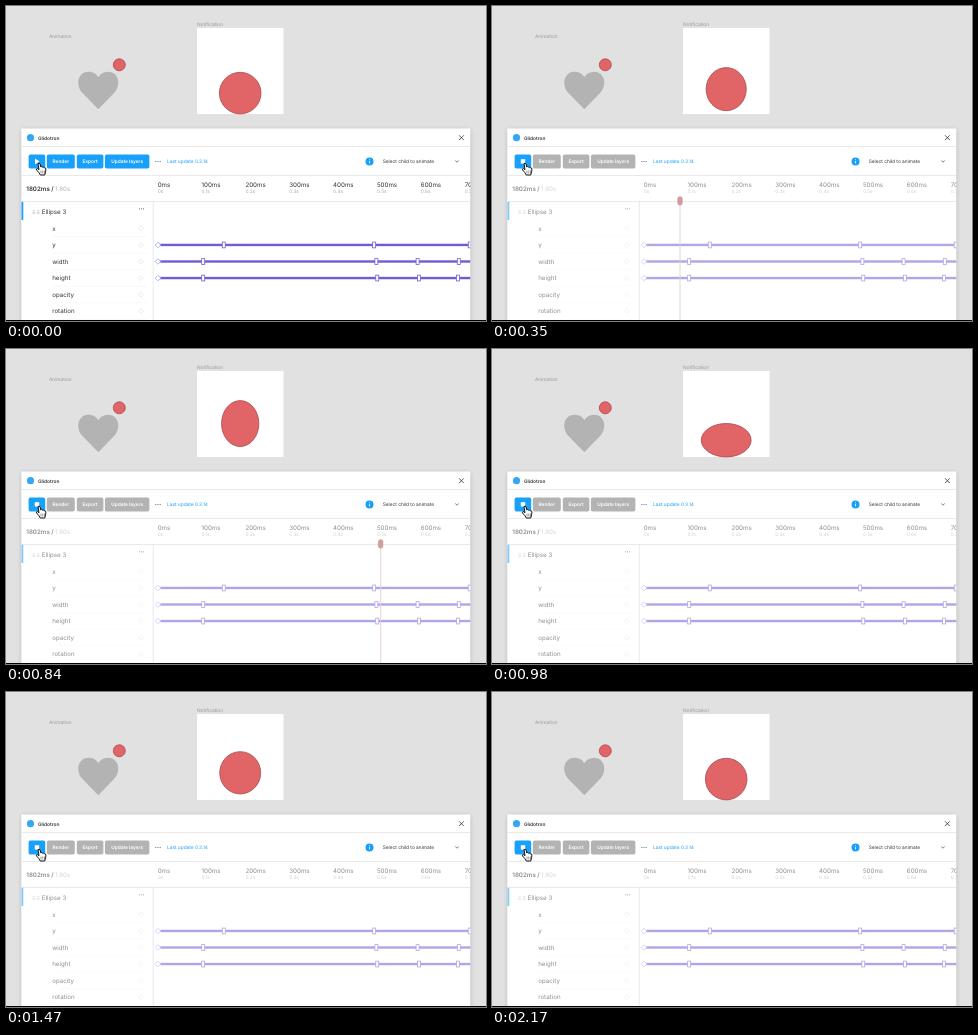
Animation of 480x315 px, one loop 2.24 s. Source, as an HTML page:

```html
<!DOCTYPE html>
<html lang="en">
<head>
<meta charset="utf-8">
<title>Bouncing notification</title>
<style>
  html, body { margin: 0; width: 100%; height: 100%; overflow: hidden; background: #e1e1e1; }
  svg { display: block; width: 480px; height: 315px; font-family: Inter, "Liberation Sans", sans-serif; text-rendering: geometricPrecision; }
  .s { font-size: 4.8px; }
  .m { font-size: 6.2px; }
  .b { font-weight: 600; }
</style>
</head>
<body>
<svg viewBox="0 0 480 315">
  <defs>
    <clipPath id="panelClip"><rect x="15.300" y="122.600" width="449" height="193"/></clipPath>
    <filter id="soft" x="-10%" y="-10%" width="120%" height="120%"><feGaussianBlur stdDeviation="2.5"/></filter>
  </defs>
  <rect width="480" height="315" fill="#e1e1e1"/>

  <g class="s" fill="#999">
    <text x="43" y="32">Animation</text>
    <text x="191" y="20">Notification</text>
  </g>
  <path fill="#b3b3b3" d="M92.300 103.300L76 86.500C69 78.500 72.300 65.800 82.500 65.800C87 65.800 90.500 68 92.300 71.200C94.200 68 97.500 65.800 102 65.800C112.300 65.800 115.700 78.500 108.500 86.500Z"/>
  <g fill="#e16467" stroke="#a9494d" stroke-width=".8">
    <circle cx="113.300" cy="58.800" r="6"/>
    <rect x="191" y="22" width="86.500" height="86" fill="#fff" stroke="none"/>
    <ellipse id="ball" cx="234.200"/>
  </g>

  <rect x="16" y="124" width="448" height="200" fill="#000" opacity=".2" filter="url(#soft)"/>
  <g clip-path="url(#panelClip)">
    <rect x="15" y="122" width="450" height="193" fill="#fff"/>
    <path d="M15 140.500H465M15 169.500H465M15 195.500H465M147.200 195V315" stroke="#e4e4e4" stroke-width=".8"/>

    <circle cx="24.500" cy="131.700" r="3.600" fill="#35a8f5"/>
    <text class="s b" x="32" y="133.500" fill="#333">Glidotron</text>
    <path d="M453 129.300L457.800 134.100M457.800 129.300L453 134.100" stroke="#333" stroke-width=".8"/>

    <g id="buttons"></g>
    <path id="play" d="M29 152.500L33.500 155.500L29 158.500Z" fill="#fff"/>
    <rect id="stop" x="28.800" y="153.200" width="4.400" height="4.400" fill="#fff"/>
    <path d="M149.200 155.500H155" stroke="#7d8a96" stroke-width="1.100" stroke-dasharray="1.200 1"/>
    <text class="s" x="161" y="157.300" fill="#18a0fb">Last update 0.3.14</text>
    <circle cx="363.500" cy="155.400" r="4" fill="#18a0fb"/>
    <path d="M363.500 154.800V157.400M363.500 153.200V153.900" stroke="#fff" stroke-width=".8"/>
    <text class="s" x="376.700" y="157.300" fill="#333">Select child to animate</text>
    <path d="M449.300 154.600L451 156.200L452.700 154.600" fill="none" stroke="#444" stroke-width=".7"/>

    <g id="timeline"></g>
    <g id="head">
      <path d="M0 198V315" stroke="#e3cdd5" stroke-width=".9"/>
      <rect x="-2.200" y="190.700" width="4.400" height="8.300" rx="2" fill="#d99b9c" stroke="#bf8b8d" stroke-width=".6"/>
    </g>
  </g>

  <path transform="translate(30 156.500)" fill="#fff" stroke="#111" stroke-linejoin="round"
    d="M2 1.200Q3.300 -.2 4.100 1.500L4.700 4.300Q6 3.500 6.600 4.700Q8 4.100 8.400 5.300Q9.900 5 9.900 6.600L9.600 9.300L8.700 12.500H4.300L2.800 10L.4 7.300Q.3 5.900 1.600 6.200L3 7.200Z"/>
  <path d="M35 164.500V167.500M36.800 164.500V167.500M38.500 164.500V167.500" stroke="#333" stroke-width=".5"/>
  <rect y="314" width="480" height="1"/>
</svg>

<script>
const LOOP = 2240, STEP = 70, START = 70;
const $ = id => document.getElementById(id);

function add(parent, tag, attrs, text) {
  const el = document.createElementNS("http://www.w3.org/2000/svg", tag);
  for (const k in attrs) el.setAttribute(k, attrs[k]);
  if (text) el.textContent = text;
  return parent.appendChild(el);
}

const timeline = $("timeline");
const rulerX = ms => 152 + .4385 * ms;
const label = (x, y, text, fill, cls) => add(timeline, "text", { x, y, fill, class: cls }, text);
const diamond = (x, y, r, stroke) => add(timeline, "path", {
  d: `M${x - r} ${y}L${x} ${y - r}L${x + r} ${y}L${x} ${y + r}Z`, fill: "#fff", stroke, "stroke-width": .7
});

function button(x, width, text) {
  const box = add($("buttons"), "rect", { x, y: 148.6, width, height: 13.9, rx: 1.8, fill: "#18a0fb" });
  add($("buttons"), "text", { x: x + width / 2, y: 157.4, class: "s b", fill: "#fff", "text-anchor": "middle" }, text);
  return box;
}
button(22.6, 16.6, "");
const actions = [button(40.8, 28, "Render"), button(70.8, 26.6, "Export"), button(98.9, 44.5, "Update layers")];

// Ruler
label(20.3, 185.3, "1802ms /", "#333", "m b");
label(49, 185.3, "1.80s", "#b3b3b3", "m");
for (let i = 0; i < 8; i++) {
  const x = rulerX(i * 100) - .3;
  label(x, 180.8, i * 100 + "ms", "#333", "m");
  label(x, 187, i ? "0." + i + "s" : "0s", "#aaa", "s");
}

// Layer row
add(timeline, "rect", { x: 15.3, y: 195.8, width: 2, height: 18.2, fill: "#18a0fb" });
for (const x of [26.5, 31])
  for (const y of [204.5, 206, 207.5]) add(timeline, "rect", { x, y, width: 2.6, height: .6, fill: "#bbb" });
for (const x of [133.5, 135.5, 137.5]) add(timeline, "circle", { cx: x, cy: 202.8, r: .6, fill: "#666" });
label(35.8, 208.2, "Ellipse 3", "#333", "m");

// Property rows, with key times in ms
const keys = { y: [150, 493, 711], width: [103, 498, 592, 686], height: [103, 500, 595, 684] };
["x", "y", "width", "height", "opacity", "rotation"].forEach((name, i) => {
  const y = 222.4 + 16.55 * i;
  label(46.2, y + 2.1, name, "#333", "m");
  add(timeline, "path", { d: `M46 ${y + 8.2}H141`, stroke: "#f2f2f2", "stroke-width": .6 });
  diamond(134.8, y, 2.4, "#e0e0e0");
  if (!keys[name]) return;
  add(timeline, "rect", { x: 152, y: y - 1.2, width: 313, height: 2.4, fill: "#6f5dd6" });
  diamond(152, y, 2.8, "#7fa9ea");
  for (const ms of keys[name])
    add(timeline, "rect", { x: rulerX(ms) - 1.5, y: y - 2.9, width: 3, height: 5.8, fill: "#fff", stroke: "#6f5dd6", "stroke-width": .8 });
});

const progress = (t, from, to) => Math.min(1, Math.max(0, (t - from) / (to - from)));
const smooth = p => p * p * (3 - 2 * p);
const hop = (t, from, to, height) => { const p = progress(t, from, to); return 4 * height * p * (1 - p); };

// One high leap with a gravity fall, then smaller hops
function lift(t) {
  const leap = 39 * smooth(progress(t, 290, 630)) * (1 - progress(t, 630, 875) ** 2);
  return leap + hop(t, 1000, 1300, 15) + hop(t, 1300, 1610, 6) + hop(t, 1700, 1870, 4);
}

// Tall in flight, flattened on landing, then a damped wobble
function stretch(t) {
  if (t < 980) return 4.5 * smooth(progress(t, 220, 560)) - 12.7 * smooth(progress(t, 830, 980));
  const age = t - 980;
  return -8.2 * Math.exp(-age / 200) * Math.cos(2 * Math.PI * age / 336);
}

// The playhead starts slowly, then runs to catch up
function playhead(t) {
  return 152 + 36 * progress(t, 70, 350) + 22 * progress(t, 350, 630) + .784 * Math.max(0, t - 630);
}

function draw(now) {
  let t = Math.floor(now % LOOP / STEP) * STEP;
  if (t > 350 && t < 490) t = 350; // short stall
  const playing = t >= START, s = stretch(t);
  const rx = 21 + s / 2, ry = 21 + s / 2;
  const ball = $("ball");
  ball.setAttribute("rx", rx - s - .2);
  ball.setAttribute("ry", ry - .2);
  ball.setAttribute("cy", 108.1 - lift(t) - ry);
  timeline.setAttribute("opacity", 1 - .45 * progress(t, 0, 140));
  for (const box of actions) box.setAttribute("fill", playing ? "#b3b3b3" : "#18a0fb");
  $("play").style.display = playing ? "none" : "";
  $("stop").style.display = $("head").style.display = playing ? "" : "none";
  $("head").setAttribute("transform", `translate(${playhead(t)} 0)`);
}

const begin = performance.now();
function tick() {
  draw(performance.now() - begin);
  requestAnimationFrame(tick);
}
tick();
</script>
</body>
</html>
```
